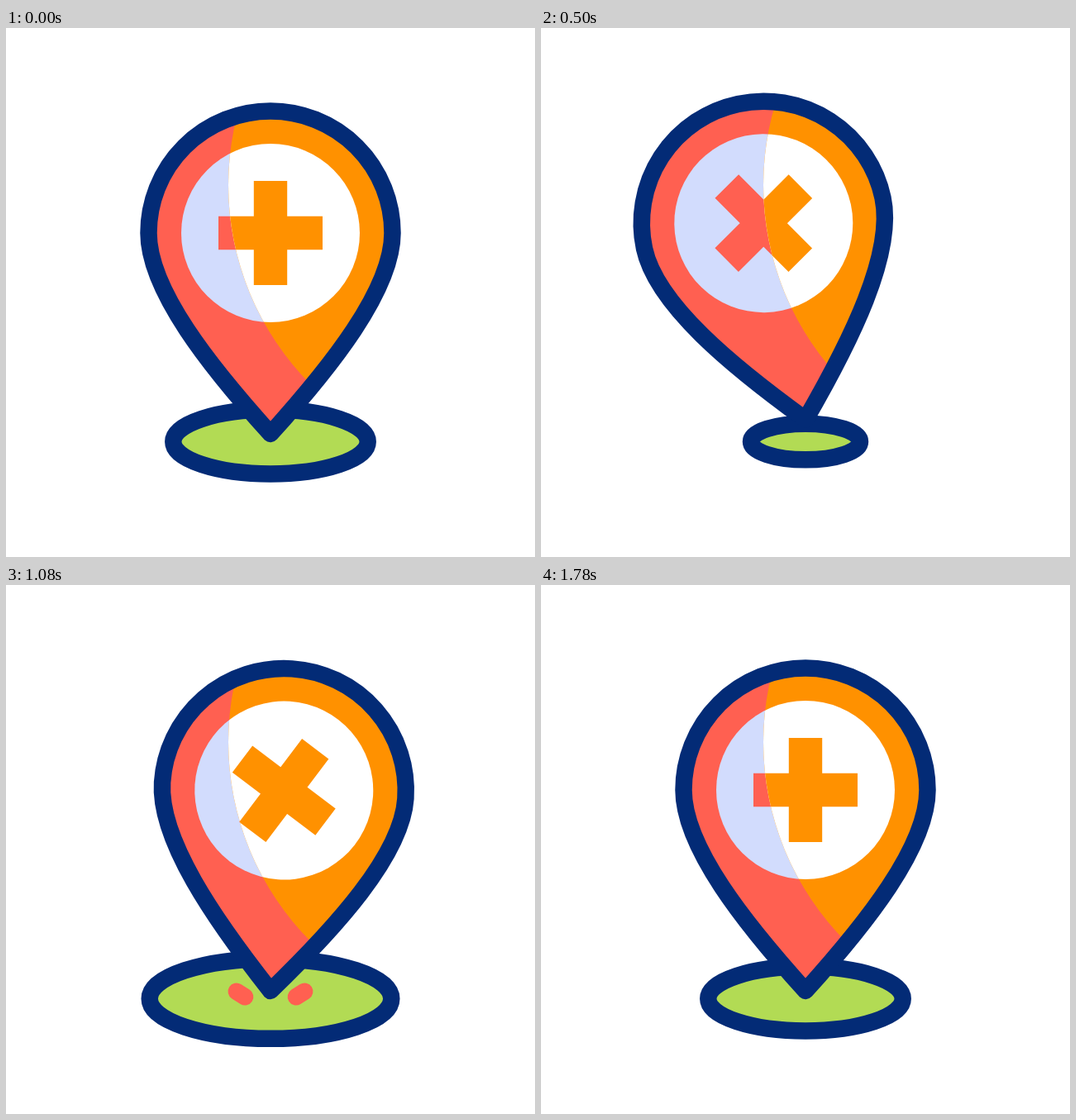
These frames come from a looping animation (640x640 px, 2.42 s). An HTML page with a canvas:

```html
<!DOCTYPE html>
<html lang="en">
<head>
<meta charset="utf-8">
<title>Medical location pin</title>
<style>
  html, body { margin: 0; width: 100%; height: 100%; overflow: hidden; background: #fff; }
  canvas { display: block; width: 640px; height: 640px; }
</style>
</head>
<body>
<canvas id="stage" width="640" height="640"></canvas>
<script>
const ctx = document.getElementById('stage').getContext('2d');
const LOOP = 2420, TAU = Math.PI * 2, RAD = Math.PI / 180;
const NAVY = '#032b76', RED = '#ff6051', ORANGE = '#ff9100',
      LAVENDER = '#d2dcfd', GREEN = '#b2db54', WHITE = '#fff';
const STROKE = 20.5, HEAD = 243, RADIUS = 147.5;
const TOP = 750, LAND = 1020, BACK = 838, FORTH = 1095;

const mix = (a, b, k) => a + (b - a) * k;
const progress = (t, from, to) => Math.min(1, Math.max(0, (t - from) / (to - from)));
const easeOut = u => 1 - (1 - u) ** 2;

// Ease in and out; a power above 1 delays the start
const ease = (t, from, to, power = 1) =>
  (1 - Math.cos(Math.PI * progress(t, from, to) ** power)) / 2;

// Lean back, swing forward, then wobble to rest
function swingAt(t) {
  if (t < FORTH) return mix(-18.5 * ease(t, 0, BACK), 4, ease(t, BACK, FORTH));
  const fade = 1 - progress(t, FORTH, 1620) ** 2;
  return 4 * fade * Math.cos(Math.PI * (t - FORTH) / 135);
}

const liftAt = t => 40 * (ease(t, 0, TOP, 1.95) - ease(t, TOP, LAND));

// Shrinks as the pin rises, overshoots on landing
const groundAt = t => 1 - .66 * ease(t, 0, TOP, 1.235)
  + .91 * ease(t, TOP, 1100, 1.05) - .25 * ease(t, 1100, 1320);

// One full turn: speeds up, snaps over at the landing, slows down
function spinAt(t) {
  const speedUp = 180 * (t / 1003) ** 2;
  const slowDown = 360 - 158 * (1 - progress(t, 1000, 1785)) ** 2;
  return -mix(speedUp, slowDown, ease(t, 940, 1080));
}

function fill(color) {
  ctx.fillStyle = color;
  ctx.fill();
}

function stroke(color) {
  ctx.strokeStyle = color;
  ctx.lineWidth = STROKE;
  ctx.stroke();
}

function drawGround(scale) {
  ctx.beginPath();
  ctx.ellipse(320, 500.5, 117.7 * scale, 38.9 * scale, 0, 0, TAU);
  fill(GREEN);
  stroke(NAVY);
}

function drawDashes(t) {
  const head = easeOut(progress(t, 1000, 1232)), tail = easeOut(progress(t, 990, 1490));
  if (head <= tail) return;
  for (const side of [-1, 1]) {
    const point = p => [320 + side * (17 + 42 * p), 507 - 26.5 * p];
    ctx.beginPath();
    ctx.moveTo(...point(tail));
    ctx.lineTo(...point(head));
    stroke(RED);
  }
}

// Pin outline with its tip at the origin
function pinPath() {
  ctx.beginPath();
  ctx.moveTo(0, 0);
  ctx.bezierCurveTo(-73, -81, -RADIUS, -174, -RADIUS, -HEAD);
  ctx.arc(0, -HEAD, RADIUS, Math.PI, TAU);
  ctx.bezierCurveTo(RADIUS, -174, 73, -81, 0, 0);
  ctx.closePath();
}

function placed(pose, draw) {
  ctx.save();
  ctx.translate(320, 491 - pose.lift);
  ctx.rotate(pose.swing * RAD);
  draw();
  ctx.restore();
}

function drawBody(pose, color, disc) {
  placed(pose, () => {
    pinPath();
    fill(color);
    ctx.translate(0, -HEAD);
    ctx.beginPath();
    ctx.arc(0, 0, 108, 0, TAU);
    fill(disc);
    ctx.rotate((pose.spin - pose.swing) * RAD);
    ctx.beginPath();
    ctx.rect(-63, -20.2, 126, 40.4);
    ctx.rect(-20.2, -63, 40.4, 126);
    fill(color);
  });
}

function render(t) {
  const pose = { lift: liftAt(t), swing: swingAt(t), spin: spinAt(t) };
  ctx.fillStyle = WHITE;
  ctx.fillRect(0, 0, 640, 640);
  ctx.lineCap = ctx.lineJoin = 'round';
  drawGround(groundAt(t));
  drawDashes(t);

  drawBody(pose, RED, LAVENDER);
  // The lit side stays fixed on the stage while the pin swings
  ctx.save();
  ctx.beginPath();
  ctx.arc(611, 190, 342, 0, TAU);
  ctx.clip();
  drawBody(pose, ORANGE, WHITE);
  ctx.restore();

  placed(pose, () => {
    pinPath();
    stroke(NAVY);
  });
}

const start = performance.now();
function tick() {
  render((performance.now() - start) % LOOP);
  requestAnimationFrame(tick);
}
tick();
</script>
</body>
</html>
```
